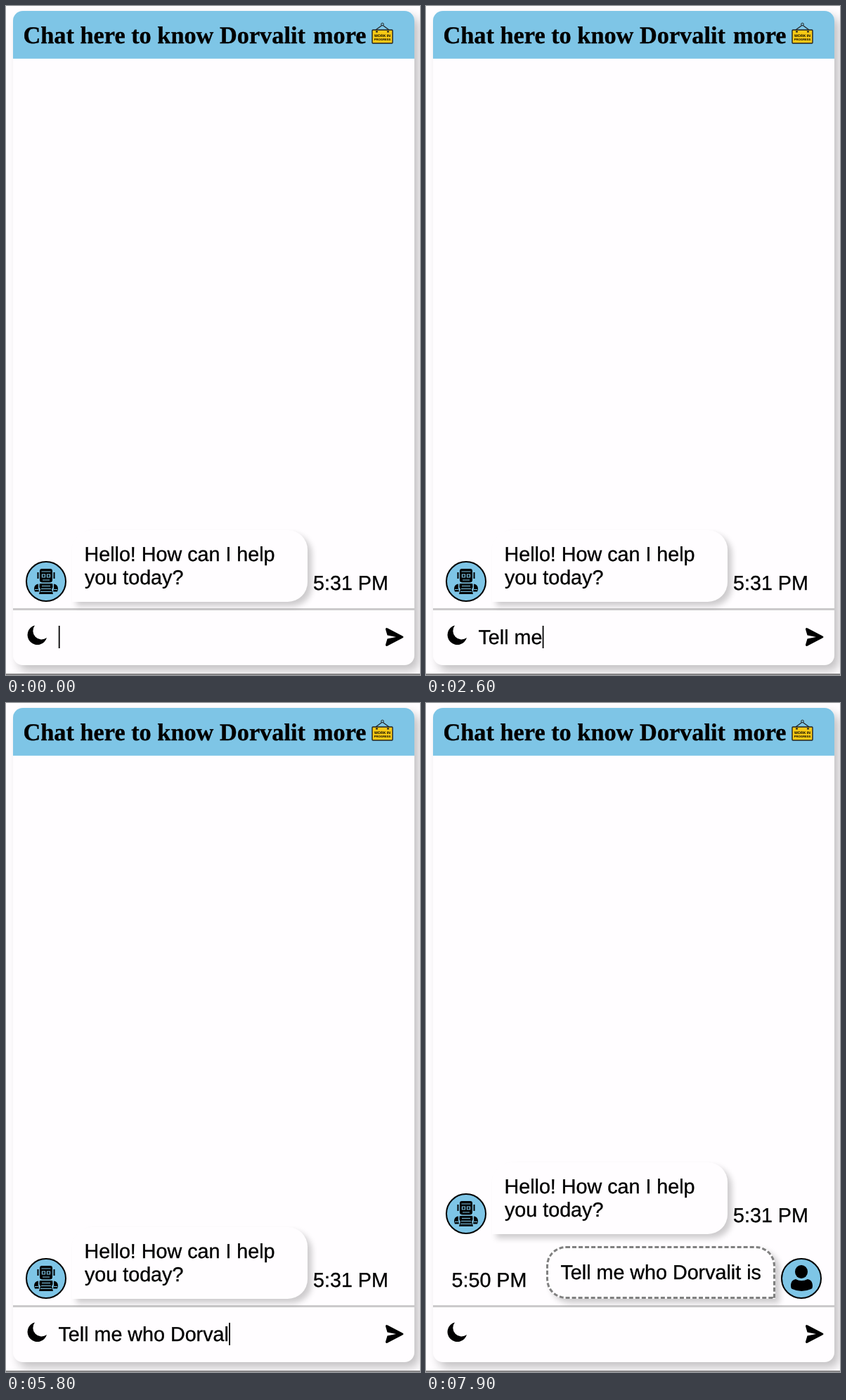
An HTML page for the animation above (8000 ms loop, 589 by 951 pixels).

```html
<!DOCTYPE html>
<html lang="en">
<head>
<meta charset="utf-8">
<title>Chat</title>
<style>
  html, body { margin: 0; width: 100%; height: 100%; overflow: hidden; background: #fffdff; }
  div, svg { position: absolute; box-sizing: border-box; }
  #card { left: 10px; top: 7px; width: 571px; height: 930px; border-radius: 14px; overflow: hidden;
    background: #fffdff; box-shadow: 7px 8px 14px rgba(0, 0, 0, .24); }
  #head { width: 100%; height: 68px; background: #7ec5e6; border-bottom: 1px solid #8fcde9; }
  #rule { top: 849px; width: 100%; height: 3px; background: #cbcacb; }
  #foot { top: 949px; width: 589px; height: 2px; background: #858485; }
  .bubble { background: #fffdff; box-shadow: 6px 6px 9px rgba(0, 0, 0, .2); }
  #hello { left: 94px; top: 745px; width: 335px; height: 102px; border-radius: 28px 28px 28px 0; }
  #sent { left: 171px; top: 772px; width: 326px; height: 75px; border: 3px dashed #808080; border-radius: 28px 28px 0 28px; }
  svg { left: 0; top: 0; }
  text { font: 28.7px "Liberation Sans", Arial, sans-serif; white-space: pre; text-rendering: geometricPrecision;
    stroke: #000; stroke-width: .35; }
  .title { font: bold 34.3px "Liberation Serif", Times, serif; }
  .sign { font-weight: bold; text-anchor: middle; stroke: none; }
  .face { fill: #7ec5e6; stroke: #000; stroke-width: 2; }
  .line { fill: none; stroke: #7ec5e6; stroke-width: 1.2; }
</style>
</head>
<body>
<div id="card"><div id="head"></div><div id="rule"></div></div>
<div id="foot"></div>
<div id="hello" class="bubble"></div>
<div id="sent" class="bubble"></div>
<svg width="589" height="951">
  <text class="title" x="24.5" y="53">Chat here to know Dorvalit</text>
  <text class="title" x="437" y="53">more</text>

  <!-- hanging sign -->
  <g stroke="#222" fill="none">
    <path d="M526 34L535.5 27L545 34" stroke-width="1.2"/>
    <circle cx="535.5" cy="26" r="1.8" fill="#7ec5e6"/>
    <rect x="521" y="34" width="29" height="19" rx="1" fill="#f9c915" stroke-width="1.4"/>
    <path d="M526 36.5h3M542 36.5h3" stroke-width="2"/>
  </g>
  <text class="sign" x="535.5" y="43.5" style="font-size:5.2px">WORK IN</text>
  <text class="sign" x="535.5" y="49.3" style="font-size:4.2px">PROGRESS</text>

  <g id="bot">
    <circle class="face" cx="57" cy="818" r="28"/>
    <path d="M48 803q0-3 3-3h12q3 0 3 3v13q0 3.500-4 3.500h-10q-4 0-4-3.500zM44.500 805h2v9h-2zM67.500 805h2v9h-2z
      M48 821h18q1.500 5-1 8l2 7h-20l2-7q-2.500-3-1-8zM40 829q0-7 6-7.500v6l1 5h-6zM74 829q0-7-6-7.500v6l-1 5h6z"/>
    <path class="line" d="M50.500 804h13M51.500 808h4v4h-4zM58.500 808h4v4h-4zM52 816h10
      M51 824.500h12M50 828.500h14M49 832.500h16M41 829.500h5M68 829.500h5"/>
    <text x="111.500" y="789">Hello! How can I help</text>
    <text x="112" y="822">you today?</text>
    <text x="437" y="830">5:31 PM</text>
  </g>

  <g id="user">
    <circle class="face" cx="534" cy="818" r="28"/>
    <ellipse cx="534" cy="808.500" rx="9" ry="9.500"/>
    <path d="M519 829C519 822 522 820 526 819Q534 823.500 543 819C547 820 550 822 550 829Q550 832 548 833Q534 839 521 833Q519 832 519 829Z"/>
    <text x="191.500" y="819">Tell me who Dorvalit is</text>
    <text x="36.500" y="830">5:50 PM</text>
  </g>

  <path d="M41 880.500A14 14 0 1 0 58 898A12.300 12.300 0 0 1 41 880.500Z"/>
  <path d="M540 886Q540 883 543 884.500L564 895.500Q567 897 564 898.500L543 909.500Q540 911 540 908L542.500 899.500L555 897L542.500 894.500Z"/>
  <text id="field" x="74.500" y="907"></text>
  <rect id="caret" y="881" width="1.800" height="32"/>
</svg>
<script>
  const LOOP = 8000, KEY = 148, BLINK = 500, SEND = 7000;
  const message = "Tell me who Dorvalit is";
  const [hello, sent, bot, user, field, caret] =
    ["hello", "sent", "bot", "user", "field", "caret"].map(id => document.getElementById(id));

  // Two typing bursts with a pause after "Tell me"
  const keyTime = i => i < 7 ? 712 + i * KEY : 4254 + (i - 7) * KEY;
  const show = (el, on) => { el.style.visibility = on ? "visible" : "hidden"; };

  function draw(t) {
    const done = t >= SEND;
    let count = 0, last = 0;
    while (!done && count < message.length && keyTime(count) <= t) last = keyTime(count++);
    if (done) last = SEND;

    field.textContent = message.slice(0, count);
    caret.setAttribute("x", 74.8 + (count ? field.getComputedTextLength() : 0));
    show(caret, (t - last) % (2 * BLINK) < BLINK);

    const lift = done ? -92 : 0;
    hello.style.transform = `translateY(${lift}px)`;
    bot.setAttribute("transform", `translate(0 ${lift})`);
    show(sent, done);
    show(user, done);
  }

  const start = performance.now();
  function tick() {
    draw((performance.now() - start) % LOOP);
    requestAnimationFrame(tick);
  }
  tick();
</script>
</body>
</html>
```
